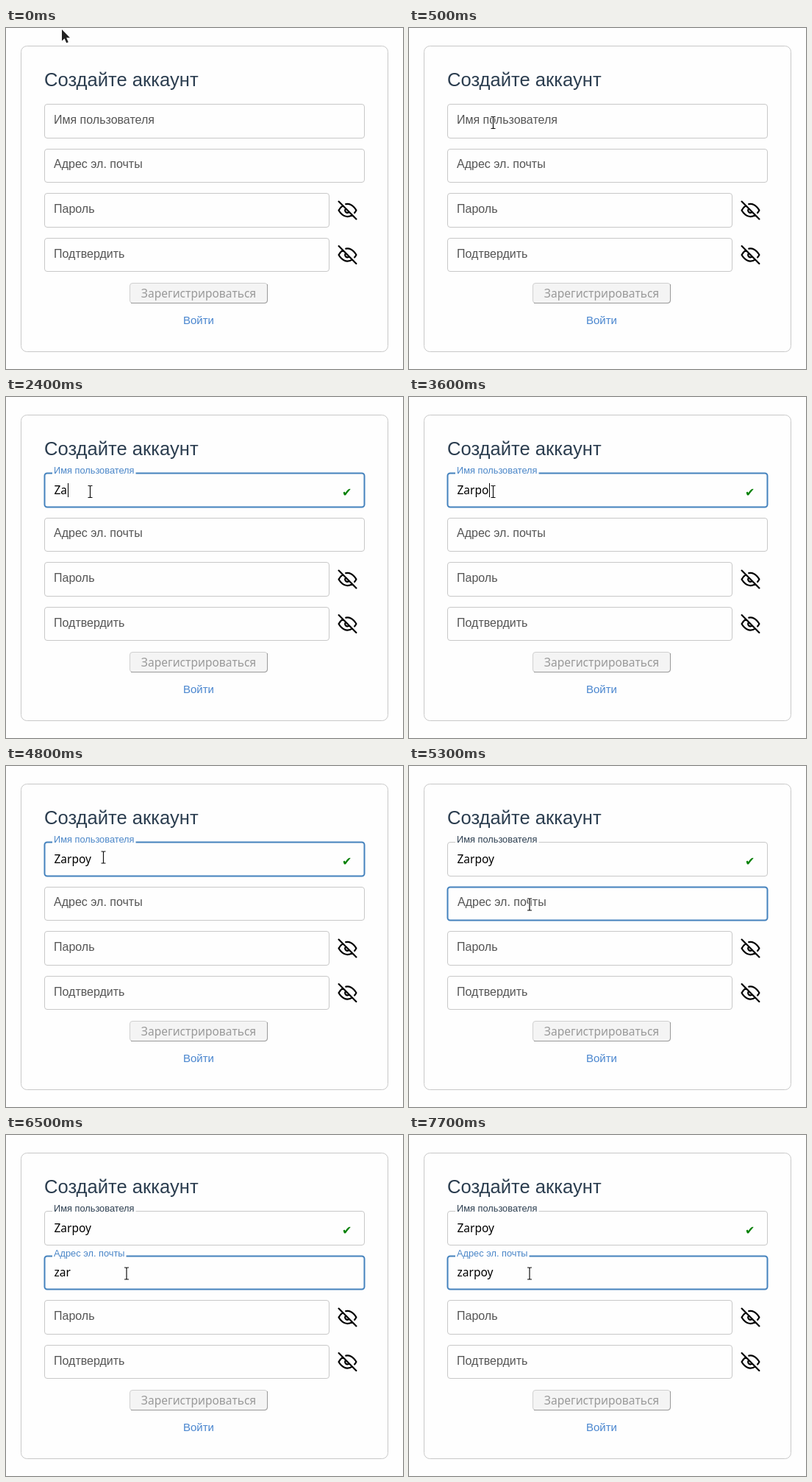
An HTML page that plays this animation: 540x463 px, repeating every 8000 ms.

```html
<!DOCTYPE html>
<html lang="ru">
<head>
<meta charset="utf-8">
<title>Создайте аккаунт</title>
<style>
  html, body { margin: 0; width: 100%; height: 100%; overflow: hidden; background: #fefefe; }
  svg { display: block; }
  text { font-family: "Liberation Sans", Arial, sans-serif; font-size: 16px; white-space: pre; }
  .box { fill: #fefefe; stroke: #c8c8c8; }
  .box.focus { stroke: #4482bd; stroke-width: 2; }
  .label { fill: #555; }
  .label.up { fill: #2c3e50; }
  .label.up.focus { fill: #4a86c8; }
  .notch { fill: #fefefe; }
  .value, .button { font-family: "Noto Sans", "Open Sans", sans-serif; font-size: 15.5px; }
  .button { fill: #999; }
  .title { font-size: 25.6px; fill: #2c3e50; }
  .link { font-size: 15px; fill: #4a86cf; }
  .check { font-family: "DejaVu Sans", sans-serif; fill: #008000; }
  .eye { fill: none; stroke: #000; stroke-width: 2; stroke-linecap: round; stroke-linejoin: round; }
</style>
</head>
<body>
<svg id="stage" width="540" height="463" viewBox="0 0 540 463">
  <defs>
    <g id="eye" class="eye">
      <path d="M17.94 17.94A10.07 10.07 0 0 1 12 20C5 20 1 12 1 12A18.45 18.45 0 0 1 6.06 6.06M9.9 4.24A9.12 9.12 0 0 1 12 4C19 4 23 12 23 12A18.5 18.5 0 0 1 20.84 15.19M14.12 14.12A3 3 0 1 1 9.88 9.88M1 1L23 23"/>
    </g>
  </defs>
  <rect class="box" x="20.5" y="24.5" width="499" height="415" rx="8"/>
  <text class="title" x="52" y="79">Создайте аккаунт</text>
  <g id="fields"></g>
  <use href="#eye" transform="translate(451.5 234.5) scale(1.083)"/>
  <use href="#eye" transform="translate(451.5 295) scale(1.083)"/>
  <rect x="168.5" y="346.5" width="187" height="27" rx="3.5" fill="#f4f4f4" stroke="#d0d0d0"/>
  <path d="M170 373.5H352Q355.5 373.5 355.5 370V348" fill="none" stroke="#999"/>
  <text class="button" x="262" y="366" text-anchor="middle">Зарегистрироваться</text>
  <text class="link" x="262" y="402" text-anchor="middle">Войти</text>
  <text id="check" class="check" x="457" y="135">✔</text>
  <rect id="caret" width="1" height="19"/>
  <path id="arrow" d="M0 0V15.5L3.6 12.2L6.2 18.3L8.8 17.2L6.2 11.2H11Z" fill="#222" stroke="#fff" stroke-width="1.2" paint-order="stroke"/>
  <g id="beam" fill="none">
    <path d="M-3 -8H-1Q0 -8 0 -7Q0 -8 1 -8H3M0 -7V7M-3 8H-1Q0 8 0 7Q0 8 1 8H3" stroke="#fff" stroke-width="3"/>
    <path d="M-3 -8H-1Q0 -8 0 -7Q0 -8 1 -8H3M0 -7V7M-3 8H-1Q0 8 0 7Q0 8 1 8H3" stroke="#111" stroke-width="1.2"/>
  </g>
</svg>
<script>
const LOOP = 8000;
const $ = id => document.getElementById(id);

function add(tag, attrs, content = "") {
  const el = document.createElementNS("http://www.w3.org/2000/svg", tag);
  for (const key in attrs) el.setAttribute(key, attrs[key]);
  el.textContent = content;
  return $("fields").appendChild(el);
}

function makeField(name, top, width, height, base) {
  const box = add("rect", { class: "box", x: 52.5, y: top + .5, width, height, rx: 3.5 });
  const notch = add("rect", { class: "notch", x: 63, y: top - 2, height: 5 });
  const label = add("text", { class: "label", x: 65, y: base }, name);
  const value = add("text", { class: "value", x: 65.5, y: base + 2 });
  return { box, notch, label, value, top, base };
}

const user = makeField("Имя пользователя", 103, 435, 46, 130);
const email = makeField("Адрес эл. почты", 164, 435, 45, 190);
makeField("Пароль", 224, 387, 46, 251);
makeField("Подтвердить", 285, 387, 45, 312);

// Keys: [time, value]; each value holds until the next key.
const cursor = [
  [0, ["arrow", 76, 2]], [200, ["arrow", 82, 18]], [300, ["arrow", 97, 52]],
  [400, ["arrow", 109, 84]], [500, ["beam", 114.5, 128.5]],
  [4500, ["beam", 123, 126]], [4600, ["beam", 131.5, 125]],
  [4800, ["beam", 132.5, 124]], [4900, ["beam", 150, 138]],
  [5000, ["arrow", 171, 154]], [5100, ["beam", 164, 188]]
];
const userKeys = [[0, 0], [1700, 1], [2400, 2], [2700, 3], [3000, 4], [3600, 5], [3800, 6]];
const emailKeys = [[0, 0], [5800, 1], [6000, 2], [6500, 3], [6600, 4], [6900, 5], [7200, 6]];
const userLift = [[0, 0], [800, .95], [900, 1]];
const emailLift = [[0, 0], [5400, .95], [5700, 1]];
const caretOn = [
  [0, 0], [800, 1], [2000, 0], [2400, 1], [3200, 0], [3600, 1], [4500, 0],
  [5400, 1], [6500, 0], [6600, 1], [7700, 0]
];

const at = (keys, t) => keys.findLast(key => key[0] <= t)[1];
const show = (el, on) => el.setAttribute("visibility", on ? "visible" : "hidden");

function drawField(f, lift, focus, text) {
  const size = 16 - 3.2 * lift;
  const shift = focus && !lift ? 1 : 0;
  f.box.classList.toggle("focus", focus);
  f.label.classList.toggle("focus", focus);
  f.label.classList.toggle("up", lift > 0);
  f.label.style.fontSize = size + "px";
  f.label.setAttribute("x", 65 + shift);
  f.label.setAttribute("y", f.base + (f.top + 1 - f.base) * lift);
  f.notch.setAttribute("width", lift ? f.label.getComputedTextLength() + 4 : 0);
  f.value.textContent = text;
}

function draw(t) {
  const name = "Zarpoy";
  const onUser = t >= 800 && t < 5300;
  const onEmail = t >= 5300;
  drawField(user, at(userLift, t), onUser, name.slice(0, at(userKeys, t)));
  drawField(email, at(emailLift, t), onEmail, name.toLowerCase().slice(0, at(emailKeys, t)));
  show($("check"), t >= 2400);

  const active = onEmail ? email : user;
  const typed = active.value.textContent ? active.value.getComputedTextLength() : 0;
  $("caret").setAttribute("x", Math.round(66 + typed));
  $("caret").setAttribute("y", active.base - 13);
  show($("caret"), at(caretOn, t));

  const [kind, x, y] = at(cursor, t);
  for (const id of ["arrow", "beam"]) {
    show($(id), id === kind);
    $(id).setAttribute("transform", `translate(${x} ${y})`);
  }
}

const start = performance.now();
function tick() {
  draw((performance.now() - start) % LOOP);
  requestAnimationFrame(tick);
}
tick();
</script>
</body>
</html>
```
